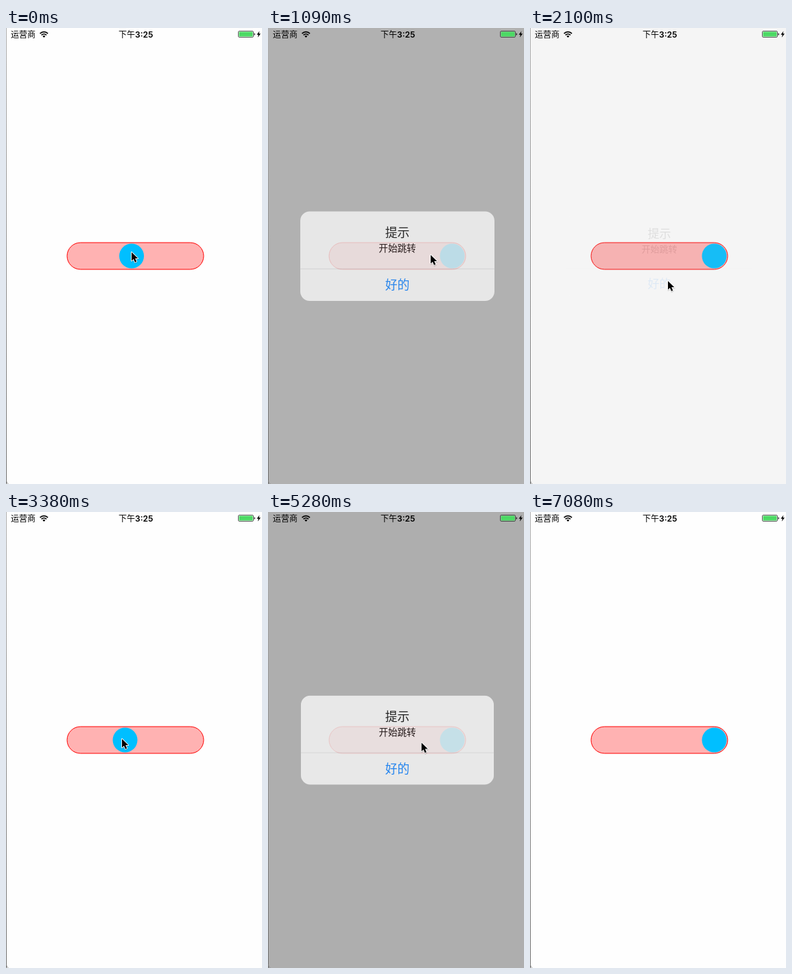
Animation of 373x665 px, one loop 7.16 s. Source, as an HTML page:

```html
<!DOCTYPE html>
<html lang="zh-CN">
<head>
<meta charset="utf-8">
<title>滑块</title>
<style>
  html, body { margin: 0; width: 100%; height: 100%; overflow: hidden; background: #fefefe; }
  svg { display: block; width: 100%; height: 100%; }
  text { font-family: Inter, "Noto Sans CJK SC", "Noto Sans CJK", sans-serif; }
  .mid { text-anchor: middle; }
</style>
</head>
<body>
<svg viewBox="0 0 373 665">
  <defs>
    <linearGradient id="edge" x2="0" y2="1">
      <stop stop-color="#b0b0b0"/>
      <stop offset="1" stop-color="#707070"/>
    </linearGradient>
    <clipPath id="panel"><rect x="53.5" y="270.4" width="270" height="124.6" rx="13"/></clipPath>
    <path id="arrow" d="M0 0V12.6L2.9 9.9 5 14.7 7.2 13.7 5.2 9.1H9.2Z"/>
  </defs>
  <rect width="373" height="665" fill="#fefefe"/>

  <rect x="89" y="313" width="199" height="39" rx="19.5" fill="#ffb2b2" stroke="#f00"/>
  <circle id="thumb" cy="332.5" r="18" fill="#00bfff"/>

  <rect id="dim" x="1" width="372" height="665"/>
  <g id="alert">
    <g clip-path="url(#panel)">
      <rect x="53" y="270" width="271" height="126" fill="#f8f8f8"/>
      <rect id="press" x="53" y="350" width="271" height="46" fill="#e8e8e8"/>
      <rect x="53" y="350" width="271" height=".7" fill="#d4d4d6"/>
    </g>
    <text class="mid" x="188.5" y="306.3" font-size="17" font-weight="500">提示</text>
    <text class="mid" x="188.5" y="326.5" font-size="13">开始跳转</text>
    <text class="mid" x="188.5" y="378.8" font-size="17" fill="#007aff">好的</text>
  </g>

  <g id="status">
    <text x="7" y="13.7" font-size="12">运营商</text>
    <path d="M49.6 8.1a8 8 0 0 1 11.4 0M51.7 10.3a5 5 0 0 1 7.2 0" fill="none" stroke="#000" stroke-width="1.7"/>
    <path d="M55.3 14l-2-2.1a2.8 2.8 0 0 1 4 0z"/>
    <text x="164" y="13.7" font-size="12" font-weight="500">下午<tspan font-weight="600">3:25</tspan></text>
    <rect x="338.5" y="4.5" width="22" height="9" rx="1.6" fill="none" stroke="#333" stroke-width=".8"/>
    <rect x="339.5" y="5.5" width="20" height="7" rx=".6" fill="#4cd964"/>
    <path d="M361.6 7.2a1.9 1.9 0 0 1 0 3.6z"/>
    <path d="M369.4 4.5l-4 5.2h2.4l-1 4 4.2-5.4h-2.5z"/>
  </g>

  <rect width="1" height="665" fill="url(#edge)"/>
  <path d="M.5 660q.2 4 3 5" fill="none" stroke="#888"/>

  <g id="cursor" stroke-linejoin="round">
    <use href="#arrow" x=".3" y="1" stroke="#000" stroke-width="2" opacity=".18"/>
    <use href="#arrow" stroke="#fff" stroke-width="1.8" paint-order="stroke"/>
  </g>
</svg>
<script>
const LOOP = 7160, LEFT = 108.5, RIGHT = 268.5, MIDDLE = 188.5, SNAP = 200;
const $ = id => document.getElementById(id);
const clamp = (v, lo, hi) => Math.min(hi, Math.max(lo, v));
const mix = (a, b, u) => a + (b - a) * u;

function ease(t, from, to) {
  const u = clamp((t - from) / (to - from), 0, 1);
  return u * u * (3 - 2 * u);
}

// Critically damped spring: share of the distance still to go
function remaining(ms, rate) {
  const x = Math.max(0, ms) * rate / 1000;
  return (1 + x) * Math.exp(-x);
}

// Hand moves: start, end, x and y reached
const moves = [
  [0, 320, 206, 328], [500, 760, 237, 331],
  [1230, 1700, 201, 369], [2100, 2510, 264, 331],
  [2640, 3380, 169, 331], [3440, 4130, 111, 330],
  [4150, 4930, 230, 330], [5150, 5640, 194, 367],
  [6020, 6500, 345, 690]
];
// The thumb follows the hand from grab to release; a tap closes the alert
const drags = [
  { grab: 0, release: 760, tap: 1950 },
  { grab: 2640, release: 3400 },
  { grab: 4150, release: 4940, tap: 6010 }
];

function cursorAt(t) {
  let x = 183, y = 327;
  for (const [from, to, nx, ny] of moves) {
    const u = ease(t, from, to);
    x = mix(x, nx, u);
    y = mix(y, ny, u);
  }
  return [x, y];
}

// On release the thumb slides to the nearer end
function thumbAt(t) {
  let x = 183;
  for (const { grab, release } of drags) {
    if (t < grab) break;
    const shift = cursorAt(Math.min(t, release))[0] - cursorAt(grab)[0];
    x = clamp(x + shift, LEFT, RIGHT);
    x = mix(x, x > MIDDLE ? RIGHT : LEFT, ease(t, release, release + SNAP));
  }
  return x;
}

function draw(t) {
  $("thumb").setAttribute("cx", thumbAt(t));
  $("cursor").setAttribute("transform", `translate(${cursorAt(t)})`);

  const { release, tap } = drags[t < drags[2].grab ? 0 : 2];
  const grow = remaining(t - release - SNAP, 21);
  const shown = (1 - grow) * remaining(t - tap, 27);
  const alpha = shown < 0.004 ? 0 : shown;
  $("dim").setAttribute("opacity", 0.4 * alpha);
  $("alert").setAttribute("opacity", alpha);
  $("alert").setAttribute("transform",
    `translate(188.5 332.5) scale(${1 + 0.2 * grow}) translate(-188.5 -332.5)`);
  $("press").setAttribute("opacity", t > tap - 280 && t < tap - 20 ? 1 : 0);
}

const start = performance.now();
function frame() {
  draw((performance.now() - start) % LOOP);
  requestAnimationFrame(frame);
}
frame();
</script>
</body>
</html>
```
